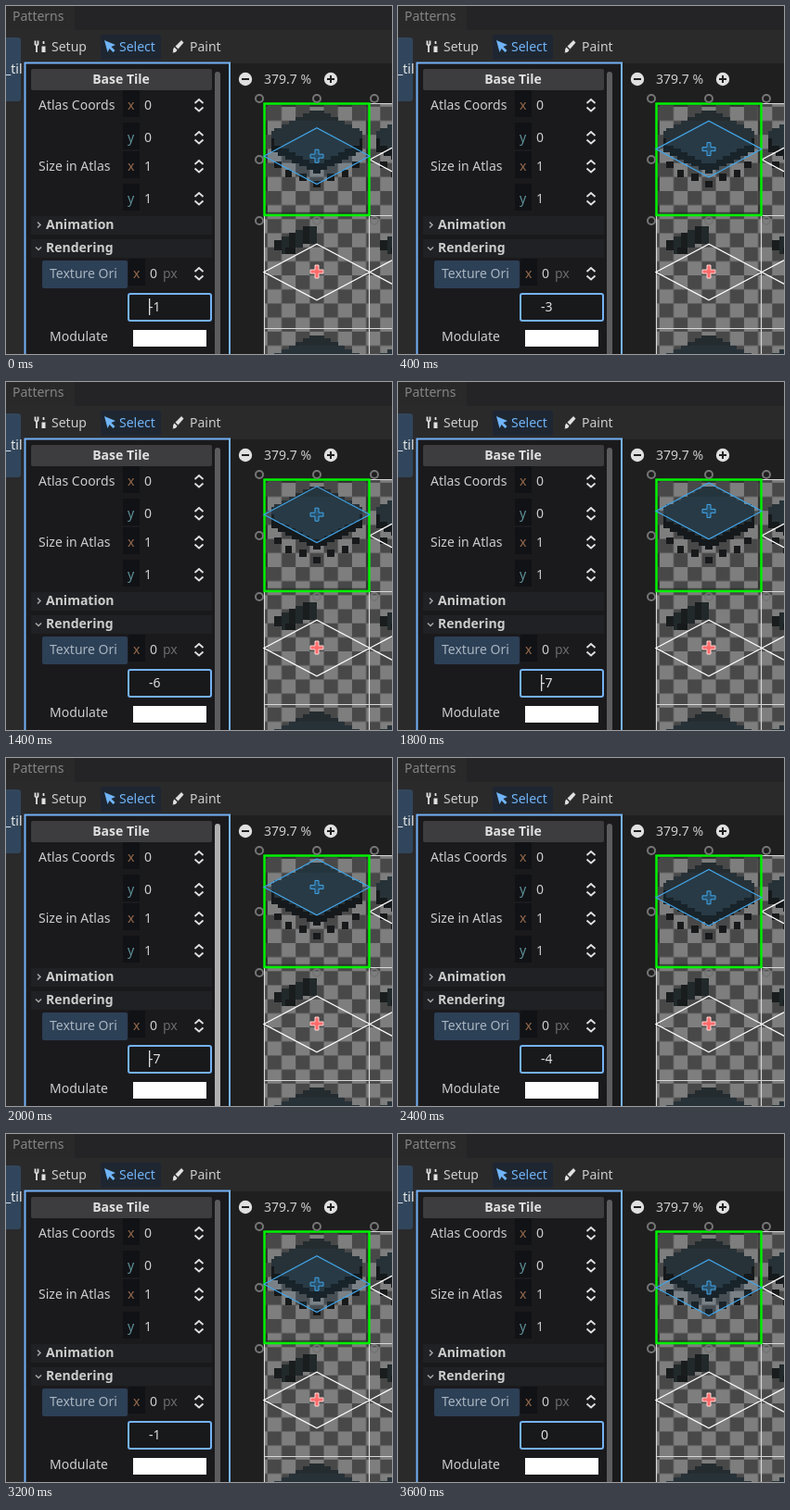
Animation of 416 by 376 pixels, one loop 3.8 s. Source, as an HTML page:

```html
<!DOCTYPE html>
<html lang="en">
<head>
<meta charset="utf-8">
<style>
html, body { margin: 0; width: 100%; height: 100%; overflow: hidden; background: #1e1e1e; }
svg { display: block; width: 416px; height: 376px; font: 14px "Noto Sans", "Open Sans", sans-serif; fill: #cdcdcd; }
.bold { font-weight: 700; }
.icon { fill: none; stroke: #e0e0e0; stroke-width: 1.8; }
.fold { fill: none; stroke: #a8a8a8; stroke-width: 1.5; }
</style>
</head>
<body>
<svg viewBox="0 0 416 376">
  <defs>
    <pattern id="checker" x="281.800" y="108.800" width="30.376" height="30.376" patternUnits="userSpaceOnUse">
      <path fill="#7e7e7e" d="M0 0h30.376v30.376H0z"/>
      <path fill="#484848" d="M0 0h15.188v15.188H0zM15.188 15.188h15.188v15.188H15.188z"/>
    </pattern>
    <clipPath id="atlas"><path d="M277 104h139v272H277z"/></clipPath>
    <path id="diamond" stroke-width="1.2" d="M-57 0L0 -30.4L57 0L0 30.4z"/>
    <path id="cross" d="M-2-7h4v5h5v4h-5v5h-4v-5h-5v-4h5z"/>
    <path id="spin" class="icon" d="M-4.5 -2L0 -6L4.5 -2M-4.5 2.500L0 6.500L4.5 2.500"/>
    <g id="tile" shape-rendering="crispEdges"></g>
    <g id="rock" shape-rendering="crispEdges"></g>
  </defs>

  <path fill="#242426" d="M0 0h416v376H0z"/>
  <path fill="#2a2a2b" d="M0 26h416v36H0zM0 62h20v314H0z"/>
  <path fill="#292929" d="M0 0h74v26H0z"/>
  <path fill="#1f1f1f" d="M242 62h174v314H242z"/>
  <text x="7" y="16" fill="#858585">Patterns</text>

  <path fill="#31465c" d="M0 34h13q3 0 3 3v63q0 3-3 3H0z"/>
  <text x="-1" y="73" fill="#e8e8e8">_til</text>

  <path class="icon" d="M33 43v7M40.500 38v3M40.500 44v6M31.500 37.500v4q1.500 2 3 0v-4"/>
  <path fill="#e0e0e0" d="M38.500 43.500h4v6.500h-4z"/>
  <text x="49" y="49">Setup</text>
  <rect x="102" y="31" width="65" height="27" rx="2" fill="#1e2631"/>
  <g fill="#70b4f8">
    <path d="M106 37l12 5-4.500 2 4 4-2 2-4-4-2 4z"/>
    <text x="122" y="49">Select</text>
  </g>
  <path fill="#e0e0e0" d="M189 37l2.500 2.500-6 7-3-3zM181.500 44.500l3 3q-1 3-5 3 1-1 .5-3 .3-2 1.500-3z"/>
  <text x="198" y="49">Paint</text>

  <path fill="#1a1a1d" stroke="#74b2f5" stroke-width="2" d="M20.500 61.500h220.500v318H20.500z"/>
  <rect x="27" y="68" width="195" height="23" rx="2" fill="#3d3d3f"/>
  <text class="bold" x="124" y="84" text-anchor="middle" fill="#e0e0e0">Base Tile</text>
  <rect id="scroll" x="225" y="71" width="6" height="312" rx="3"/>
  <text x="35" y="112">Atlas Coords</text>
  <text x="35" y="178">Size in Atlas</text>
  <g id="fields"></g>

  <path fill="#202124" d="M27 227h195v20H27zM27 252h195v20H27z"/>
  <path class="fold" d="M34 233.500l3 3-3 3M32 260.500l3 3 3-3"/>
  <text class="bold" x="43" y="241">Animation</text>
  <text class="bold" x="43" y="266">Rendering</text>

  <rect x="39" y="275" width="92" height="30" rx="2" fill="#2c4056"/>
  <text x="47" y="294" fill="#a9b4c0">Texture Ori</text>
  <text x="169" y="294" fill="#6b6b6b">px</text>
  <rect x="132" y="311" width="89" height="29" rx="2" fill="#18191b" stroke="#74b2f5" stroke-width="2"/>
  <text id="value" x="154" y="330" fill="#dedede"></text>
  <path id="caret" fill="#e0e0e0" d="M154 316h1.300v18h-1.300z"/>
  <text x="47" y="362">Modulate</text>
  <path fill="#fff" d="M137 350h79v18h-79z"/>

  <circle cx="258" cy="79" r="7.200" fill="#e0e0e0"/>
  <circle cx="350" cy="79" r="7.200" fill="#e0e0e0"/>
  <path stroke="#1f1f1f" stroke-width="2" d="M254 79h8M346 79h8M350 75v8"/>
  <text x="278" y="84">379.7 %</text>

  <g clip-path="url(#atlas)">
    <path fill="url(#checker)" d="M278 105h138v271H278z"/>
    <path fill="none" stroke="#202020" stroke-opacity=".65" stroke-width="3.800" d="M279.900 106.900h110.100v117.700H279.900z"/>
    <use href="#tile" x="278" y="105"/>
    <use href="#tile" x="391.900" y="105"/>
    <use href="#tile" x="278" y="348"/>
    <use href="#tile" x="391.900" y="348"/>
    <use href="#rock" x="278" y="226.500"/>
    <use href="#rock" x="391.900" y="226.500"/>
    <path stroke="#d8d8d8" stroke-width="1.200" d="M278.500 226v150M391.500 226v150M392 105.500h24M278 226.500h138M278 348.500h138"/>
    <g fill="none" stroke="#fff">
      <use href="#diamond" x="449" y="166"/>
      <use href="#diamond" x="335" y="287.500"/>
      <use href="#diamond" x="449" y="287.500"/>
    </g>
    <use href="#cross" x="335" y="287" fill="#ff6c6c" stroke="#ffd5d5"/>
  </g>
  <path fill="none" stroke="#00f000" stroke-width="2.500" d="M278.500 105.500h113v120.500h-113z"/>
  <g id="handles" fill="none" stroke="#757575" stroke-width="2"></g>
  <g id="origin" stroke="#42a5e8">
    <use href="#diamond" fill="#42a5e8" fill-opacity=".07"/>
    <use href="#cross" fill="#28506a"/>
  </g>
</svg>
<script>
const $ = id => document.getElementById(id);
const P = 3.797, LOOP = 3800;
const box = (x, y, w, h, fill) =>
  `<rect x="${x * P}" y="${y * P}" width="${w * P}" height="${h * P}" fill="${fill}"/>`;

// Block art: a stepped top face, a short wall, loose drips below.
function tileArt() {
  const half = row => Math.max(0, Math.min(13, 2 * row - 2, 35 - 2 * row));
  let art = '';
  for (let row = 2; row < 20; row++) {
    const wall = Math.max(half(row), row > 8 ? half(row - 2) : 0);
    art += box(15 - wall, row, 2 * wall, 1, '#15191b');
    const face = half(row) - (row < 10 ? 0 : 1);
    if (face > 0) art += box(15 - face, row, 2 * face, 1, row < 5 ? '#242c30' : '#273238');
  }
  for (const [dx, row] of [[0, 22], [4, 20], [8, 19], [11, 16.5]])
    for (const side of dx ? [-1, 1] : [1])
      art += box(14 + side * dx, row, 2, 2, '#17191a');
  return art;
}

function rockArt() {
  let art = '';
  for (let i = 0; i < 6; i++)
    art += box(3 + 2 * i, 7 - i * 0.8 | 0, 2, i < 1 ? 3 : 5, i % 2 ? '#22292a' : '#191d1e');
  return art + box(6, 9, 3, 2, '#171a1b');
}

function field(y, name, value, left = 126) {
  const color = name == 'x' ? '#94694e' : '#5f929c';
  return `<path fill="#111215" d="M${left} ${y - 16}h18v29h-18z"/>
    <text x="${left + 5}" y="${y + 5}" fill="${color}">${name}</text>
    <text x="${left + 23}" y="${y + 5}">${value}</text>
    <use href="#spin" x="208" y="${y}"/>`;
}

$('tile').innerHTML = tileArt();
$('rock').innerHTML = rockArt();
$('fields').innerHTML = field(107, 'x', 0) + field(142, 'y', 0) +
  field(173, 'x', 1) + field(208, 'y', 1) + field(289, 'x', 0, 132);
for (const [x, y] of [[273, 100], [335, 100], [397, 100], [273, 166], [273, 232], [335, 232], [397, 232]])
  $('handles').innerHTML += `<circle cx="${x}" cy="${y}" r="4"/>`;

// [start ms, offset]
const steps = [[0, -1], [400, -3], [600, -4], [800, -6], [1800, -7],
  [2200, -5], [2400, -4], [2600, -3], [3000, -1], [3600, 0]];
const caretOn = [[0, 200], [600, 1200], [1800, 2400], [2800, 3200]];

function draw(now) {
  const t = now % LOOP;
  const value = steps.findLast(s => s[0] <= t)[1];
  const caret = caretOn.some(([a, b]) => t >= a && t < b);
  $('value').textContent = value;
  $('caret').style.display = caret ? '' : 'none';
  $('origin').setAttribute('transform', `translate(335 ${166 + value * P})`);
  $('scroll').setAttribute('fill', t >= 2000 && t < 2200 ? '#b0b0b0' : '#5c5c5e');
}

let start;
function tick(now) {
  start ??= now;
  draw(now - start);
  requestAnimationFrame(tick);
}
draw(0);
requestAnimationFrame(tick);
</script>
</body>
</html>
```
